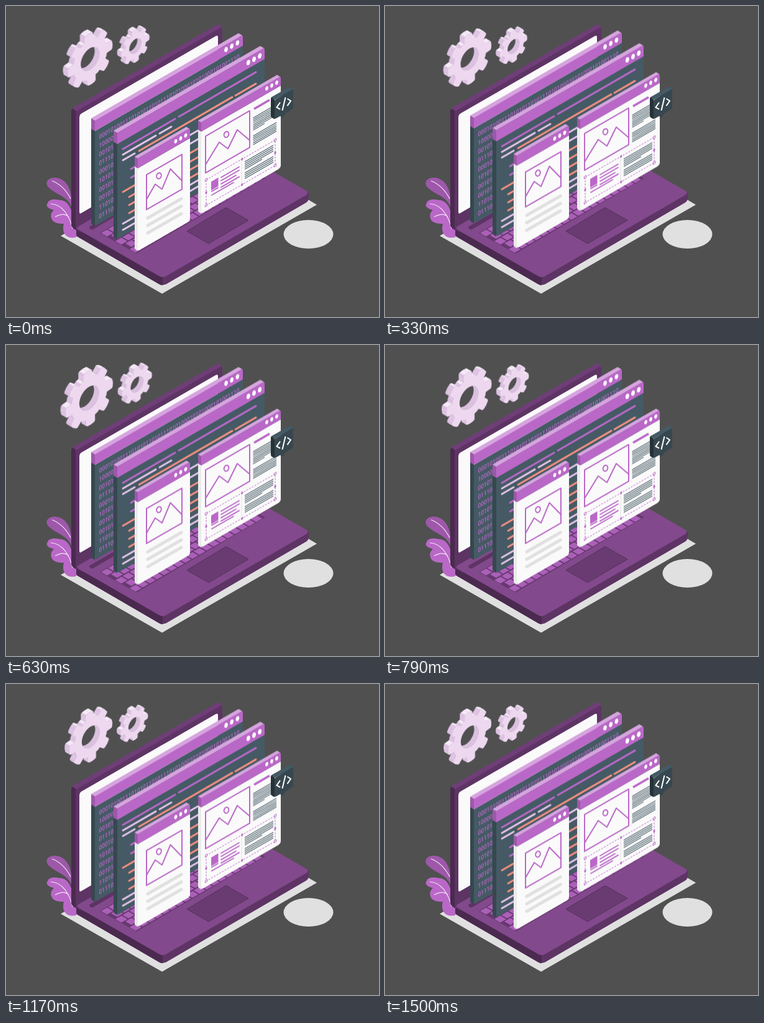
Recreate the animation shown at these times as an HTML page. Size 600 by 500 pixels, loop 1540 ms.

```html
<!DOCTYPE html>
<html lang="en">
<head>
<meta charset="utf-8">
<title>Laptop windows</title>
<style>
  html, body { margin: 0; width: 100%; height: 100%; overflow: hidden; background: #505050; }
  svg { display: block; width: 600px; height: 500px; }
  .float { animation: float 1540ms linear -40ms infinite; }
  .beat { transform-origin: 162px 82px; animation: beat 1540ms ease -40ms infinite; }
  text { font: 500 10.5px Roboto, sans-serif; fill: #ba68c8; }
  @keyframes float {
    0%, 100% { transform: translateY(.5px); }
    48.7% { transform: translateY(-9.5px); }
  }
  @keyframes beat {
    0%, 30.5%, 32.5%, 64.9%, 100% { transform: scale(1); }
    11% { transform: scale(1.1); }
    48.7% { transform: scale(1.105); }
  }
</style>
</head>
<body>
<svg viewBox="0 0 600 500">
  <g id="floor" fill="#e0e0e0">
    <path d="M88 369.500L251 462.500L500 319.500L340 226z"/>
    <ellipse cx="486.500" cy="367" rx="40" ry="23"/>
  </g>
  <g id="plant" fill="none">
    <path fill="#9e58aa" d="M106 325C100 306 82 304 70 293C60 284 68 275 80 276C97 278 107 293 106 325z"/>
    <path fill="#ba68c8" d="M112 372C98 375 89 366 93 350C84 350 75 349 73 341C71 335 74 331 77 328C68 326 63 321 67 317C68 311 78 310 86 312C98 311 107 325 108 345L120 366z"/>
    <path stroke="#f1e1f4" stroke-width="1.200" d="M74 281C89 287 98 298 104 310M72 318C90 319 102 336 107 358M79 339C90 333 97 335 101 339"/>
  </g>
  <g id="screen">
    <path fill="#6f3e78" d="M105 171Q105 166 109 163L338 31Q342 28 345 31Q348 33 348 37V230L118 363Q105 357 105 351z"/>
    <path fill="#5d3464" d="M112 173Q112 170 115 168L345 35Q348 34 348 38V230L118 363L112 360z"/>
    <path fill="#4b2a50" d="M105 170Q105 166 107 165L113 169Q112 171 112 174V360Q105 357 105 351z"/>
    <path fill="#fafafa" d="M118 180Q118 175 121 173L338 48Q341 47 341 50V205L121 333Q118 335 118 331z"/>
  </g>
  <g id="base">
    <path fill="#5d3464" d="M113 360V367Q113 370 117 372L246 447Q252 450 258 447L483 316Q487 313 487 309V300L350 300z"/>
    <path fill="#4b2a50" d="M113 360V367Q113 370 117 372L246 447Q249 449 252 449V420z"/>
    <path fill="#82498c" d="M117 360Q112 357 117 354L345 223Q350 220 355 223L483 297Q488 300 483 304L258 434Q252 438 246 434z"/>
    <path fill="#5d3464" d="M134 355L350 230L356 234L140 359Q134 360 134 355z"/>
    <path fill="#6a3b72" stroke="#53305a" d="M291 362L354 324L390 344.500L326 382z"/>
  </g>
  <g id="keys"></g>
  <g class="float" id="windows"></g>
  <g id="tag">
    <path fill="#263238" d="M426 149Q426 147 428 146L432 151V182L427 179Q426 178 426 176z"/>
    <path fill="#455a64" d="M427 146.500L456 130Q458 129 461 132L462 134L432 151z"/>
    <path fill="#37474f" d="M432 153Q432 151 434 150L459 135Q462 133 462 137V163Q462 165 460 166L449 173L445 180L441 177L434 181Q432 182 432 180z"/>
    <path fill="none" stroke="#fff" stroke-width="2" d="M441 155L435.500 163L441 166M449.500 147L444.500 168M452.500 149L458 152.500L452.500 160.500"/>
  </g>
  <g class="beat" id="gears"></g>
</svg>
<script>
const SLOPE = .577;
const PURPLE = '#ba68c8', PALE = '#e3c3e9', SALMON = '#f28f81', GREY = '#e0e0e0', SLATE = '#455a64';
const $ = id => document.getElementById(id);
const path = (d, fill, extra = '') => `<path d="${d}" fill="${fill}" ${extra}/>`;

// Straight stroke running up to the right along the isometric axis.
const seg = (x1, y1, x2, color, width, cap = 'round') =>
  path(`M${x1} ${y1}L${x2} ${y1 - SLOPE * (x2 - x1)}`, 'none',
    `stroke="${color}" stroke-width="${width}" stroke-linecap="${cap}"`);

const slab = (x, y, w, h) =>
  `M${x} ${y}l${w} ${-SLOPE * w}v${h}l${-w} ${SLOPE * w}z`;

function panel(x, y, w, h, head, depth, body, side, dot, content) {
  const back = `l${-depth} ${-SLOPE * depth}`;
  const ahead = `l${depth} ${SLOPE * depth}z`;
  let dots = '';
  for (let i = 0; i < 3; i++) {
    const cx = dot.x + i * dot.gap, cy = dot.y - i * dot.gap * SLOPE;
    dots += `<ellipse cx="${cx}" cy="${cy}" rx="${dot.r * .62}" ry="${dot.r}" transform="rotate(16 ${cx} ${cy})" fill="#fff"/>`;
  }
  return path(`M${x} ${y}${back}v${h - 2}q0 2 2 3L${x} ${y + h}z`, side)
    + path(`M${x} ${y}${back}v${head}${ahead}`, '#9e58aa')
    + path(`M${x} ${y}${back}l${w - 1} ${-SLOPE * (w - 1)}${ahead}`, '#d6a4de')
    + `<g transform="matrix(1 ${-SLOPE} 0 1 ${x} ${y})">`
    + path(`M0 ${head}H${w}V${h - 4}q0 4 -4 4H3q-3 0 -3 -3z`, body)
    + path(`M0 ${head}V0H${w - 2}q2 0 2 3V${head}z`, PURPLE) + '</g>'
    + dots + content;
}

const picture = (x, y, w, h, peaks, sun) =>
  path(slab(x, y, w, h) + 'M' + peaks, 'none', `stroke="${PURPLE}" stroke-width="2" stroke-linejoin="round"`)
  + `<ellipse cx="${sun[0]}" cy="${sun[1]}" rx="3.700" ry="4.800" transform="rotate(20 ${sun})" fill="none" stroke="${PURPLE}" stroke-width="2"/>`;

function binary() {
  const rows = ['000101001110101011010111010100010101000101001110101011',
    '10000', '00101', '01110', '00010', '10101', '00101', '00101', '11010', '01110'];
  return rows.map((s, i) =>
    `<text transform="matrix(.79 -.456 0 1 149.500 ${214.5 + i * 14.2})">${s.slice(0, 48)}</text>`).join('');
}

function code() {
  let out = seg(188, 230, 272, PURPLE, 3) + seg(278, 178, 402, PURPLE, 3)
    + seg(188, 239, 241, PALE, 3) + seg(247, 205, 266, PALE, 3)
    + seg(188, 248, 207, PALE, 3) + seg(214, 233, 364, SALMON, 3) + seg(369, 144, 402, SALMON, 3);
  for (const y of [262, 276]) out += seg(201, y, 225, PURPLE, 3) + seg(290, y - 51, 312, PALE, 3);
  out += seg(188, 299, 330, SALMON, 3);
  for (const y of [307, 320, 333]) out += seg(198, y, 330, SALMON, 3);
  for (const y of [350, 360]) out += seg(188, y, 320, PALE, 3);
  return out;
}

function card() {
  let out = picture(226, 271.5, 57, 56, '226 311L240 286.500L251 294.500L264.500 262L283 281', [246, 273]);
  for (const y of [342, 354, 366]) out += seg(228, y - 1, 282, GREY, 5);
  return out;
}

function dashed() {
  const x = 322, y = 279.5, w = 111, h = 41;
  let out = path(slab(x, y, w, h), 'none', `stroke="${PURPLE}" stroke-width="1" stroke-dasharray="3 2"`);
  for (const u of [0, .52, 1]) for (const v of [0, .5, 1]) {
    if (u === .52 && v === .5) continue;
    const cx = x + u * w, cy = y + v * h - SLOPE * u * w;
    const corner = u !== .52 && v !== .5;
    out += corner ? path(slab(cx - 1.6, cy - .8, 3.2, 3.4), '#fafafa', `stroke="${PURPLE}"`)
      : path(`M${cx - 2} ${cy + 1}L${cx} ${cy - 2.6}L${cx + 2} ${cy - 1}L${cx} ${cy + 2.6}z`, PURPLE);
  }
  return out;
}

function page() {
  const thin = (x, y, x2) => seg(x, y, x2, SLATE, 1.1, 'butt');
  let out = picture(321, 209.5, 71, 59, '321 255L343 219L357 229.500L372 199L392 216', [354.5, 206.5])
    + seg(399, 165.5, 424, PURPLE, 3.6, 'butt');
  for (let i = 0; i < 8; i++) out += thin(397.5, 180 + i * 2.8, i === 7 ? 416 : 435);
  for (let i = 0; i < 6; i++) out += thin(397.5, 209 + i * 2.8, 435);
  for (let i = 0; i < 10; i++) if (i !== 5) out += thin(384, 250.5 + i * 3, i === 4 ? 412 : 430);
  out += path(slab(330, 282.5, 11.5, 14), PURPLE) + path('M379 250V284', 'none', 'stroke="#e0e0e0"');
  for (let i = 0; i < 4; i++) out += seg(346, 275.5 + i * 5.3, i === 2 ? 370 : 375, PURPLE, 1.9);
  return out + seg(331, 298, 341, PURPLE, 1.9) + seg(331, 304, 366, PURPLE, 1.9) + dashed();
}

function keyboard() {
  let out = path('M151 365L359 245L417 277L210 398z', '#67396f');
  for (let r = 0; r < 5; r++) {
    const left = 153 + 11.5 * r, top = 365 + 6.5 * r;
    const shift = r % 2 * 4.6;
    for (let n = 0; n < 18 - r % 2; n++) {
      const dx = 11.4 * n + shift;
      out += path(`M${left + dx} ${top - SLOPE * dx}l9.600 -5.500l9.600 5.400l-9.600 5.500z`, '#ab60b8');
    }
  }
  return out;
}

function gear(cx, cy, r, hole, depth) {
  const at = (rad, deg) => {
    const a = deg * Math.PI / 180, u = rad * Math.cos(a), v = rad * Math.sin(a);
    return [cx + .866 * u, cy + v - .5 * u].map(n => +n.toFixed(2));
  };
  const outline = [], ring = [];
  for (let a = -4; a < 356; a += 45) {
    outline.push(at(r * .77, a - 15), at(r * .98, a - 11), at(r * 1.01, a - 8),
      at(r * 1.02, a), at(r * 1.01, a + 8), at(r * .98, a + 11), at(r * .77, a + 15), at(r * .78, a + 22));
  }
  for (let a = 360; a > 0; a -= 10) ring.push(at(hole, a));

  // Side faces: keep those turned towards the back edge, lighter when facing up.
  const walls = (points, up, side) => points.map(([x, y], i) => {
    const [x2, y2] = points[(i + 1) % points.length];
    const nx = y2 - y, ny = x - x2;
    if (nx + SLOPE * ny >= 0) return '';
    const fill = ny < nx ? up : side;
    return path(`M${x} ${y}L${x2} ${y2}l${-depth} ${-SLOPE * depth}L${x - depth} ${y - SLOPE * depth}z`,
      fill, `stroke="${fill}" stroke-width=".4"`);
  }).join('');

  return walls(outline, '#f6eaf8', '#dfc4e4') + walls(ring, '#dfc4e4', '#dfc4e4')
    + path(`M${outline.join('L')}zM${ring.join('L')}z`, '#edd8f0', 'fill-rule="evenodd"');
}

$('keys').innerHTML = keyboard();
$('windows').innerHTML =
  panel(143, 184, 238, 170, 17, 6, SLATE, '#37474f', { x: 354, y: 70, gap: 9.2, r: 4.2 }, binary())
  + panel(179, 204, 237, 171, 18, 6, SLATE, '#37474f', { x: 389.8, y: 91, gap: 9.2, r: 4.4 }, code())
  + panel(314, 187, 128, 147, 15, 5, '#fafafa', '#ebebeb', { x: 419.5, y: 132.5, gap: 8, r: 3.6 }, page())
  + panel(212, 245, 84, 149, 16, 5, '#fafafa', '#ebebeb', { x: 273, y: 217.5, gap: 8, r: 3.6 }, card());
$('gears').innerHTML = gear(136.2, 85, 39.6, 16.6, 6.9) + gear(206.3, 65, 25, 10.8, 6);
</script>
</body>
</html>
```
